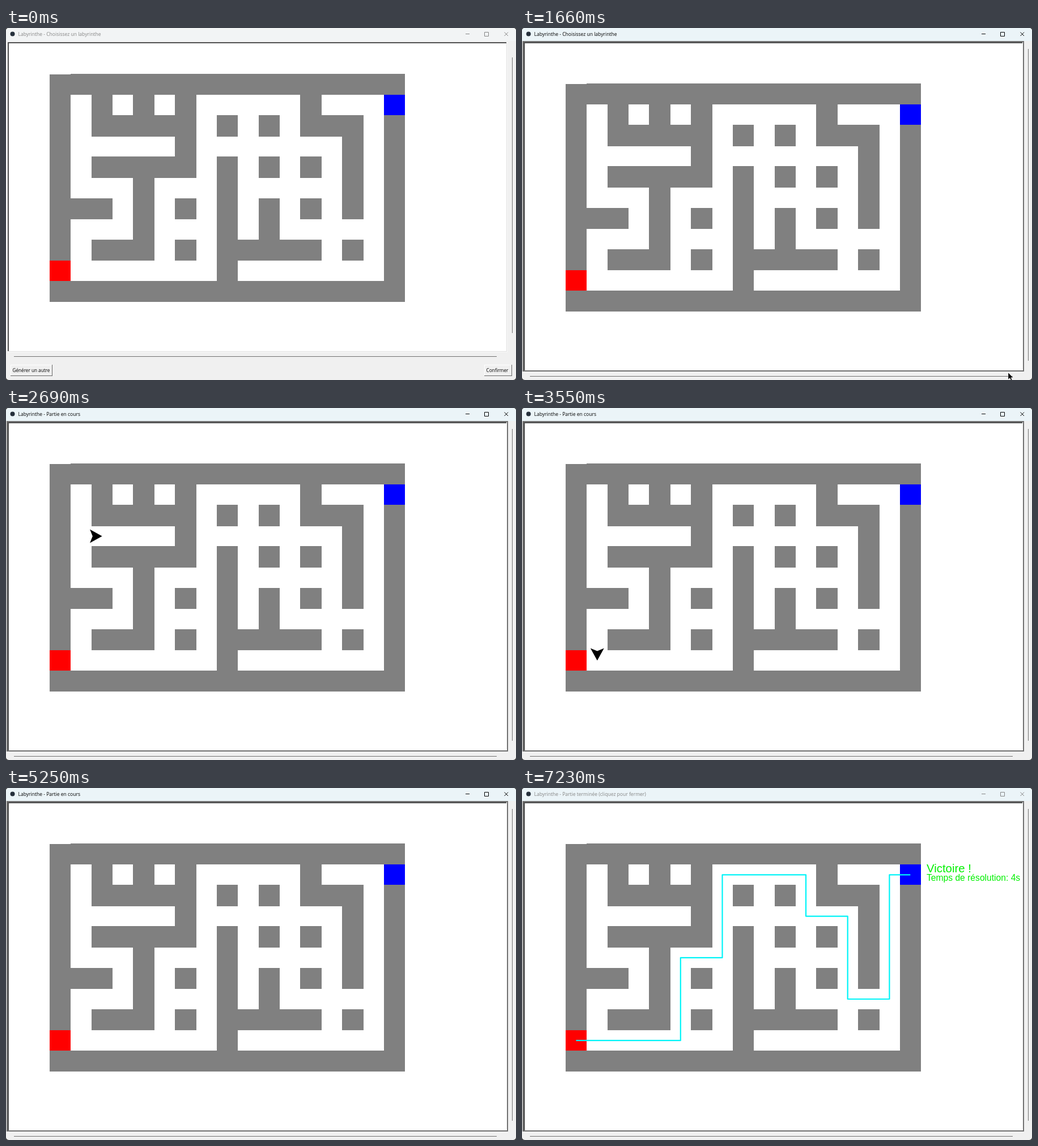
Recreate the animation shown at these times as an HTML page. Size 900 by 622 pixels, loop 7310 ms.

```html
<!DOCTYPE html>
<html lang="fr">
<head>
<meta charset="utf-8">
<title>Labyrinthe</title>
<style>
  html, body { margin: 0; width: 100%; height: 100%; overflow: hidden; background: #3a3a3a; }
  svg { display: block; width: 900px; height: 622px; }
  .ui { font-family: "Open Sans", "Noto Sans", sans-serif; }
  .score { font-family: "Liberation Sans", Arial, sans-serif; fill: #00f000; }
  .crisp { shape-rendering: crispEdges; }
</style>
</head>
<body>
<svg viewBox="0 0 900 622" xmlns="http://www.w3.org/2000/svg">
  <rect width="900" height="622" rx="5" fill="#f0f0f0"/>
  <path id="bar" d="M0 23V5Q0 0 5 0H895Q900 0 900 5V23Z"/>
  <circle cx="11.5" cy="10.5" r="4" fill="#26303c"/>
  <text id="title" class="ui" x="21.5" y="14" font-size="8.55"></text>
  <path id="controls" d="M811 10.5H818M844.5 7.5H851.5V14.5H844.5ZM879.5 7.5L886 14M886 7.5L879.5 14" fill="none" stroke-width="1"/>

  <g id="chooser" class="crisp">
    <rect x="3" y="25" width="882" height="548" fill="#fff"/>
    <path d="M884.5 25V572.5H3" fill="none" stroke="#fafafa"/>
    <path d="M883.5 26V571.5H4" fill="none" stroke="#e0e0e0"/>
    <path d="M4 571V26H883" fill="none" stroke="#505050" stroke-width="2"/>
    <path d="M893.5 52V539M14 580.5H866" stroke="#707070"/>
    <path d="M8.500 614V595.500H81M844.500 614V595.500H892" fill="none" stroke="#fff"/>
    <path d="M8 614.500H81.500V595M844 614.500H892.500V595" fill="none" stroke="#696969"/>
    <g class="ui" font-size="8.2">
      <text x="11.500" y="608">Générer un autre</text>
      <text x="847.500" y="608">Confirmer</text>
    </g>
  </g>

  <g id="board" class="crisp">
    <rect x="2" y="24" width="883" height="582" fill="#fff" stroke="#707070" stroke-width="2"/>
    <path d="M4 605V26H883" fill="none" stroke="#505050" stroke-width="2"/>
    <path d="M893.5 37V588M14 615.5H866" stroke="#707070"/>
  </g>

  <g id="maze" class="crisp"></g>
  <path id="trail" fill="none" stroke="#00f4f8" stroke-width="2.2" stroke-linejoin="round"/>
  <path id="player" d="M0 0L-21.6 -12L-16.8 0L-21.6 12Z"/>
  <g id="score" class="score">
    <text x="714" y="149" font-size="20.4">Victoire !</text>
    <text x="714" y="164" font-size="15.65">Temps de résolution: 4s</text>
  </g>
  <path id="cursor" d="M0 0V12L2.8 9.4L5 13.5L6.8 12.6L4.8 8.7H8.500Z" stroke="#fff" stroke-width=".4"/>
</svg>
<script>
const LOOP = 7310, GAME_START = 1830, STEP = 77.7;
const $ = id => document.getElementById(id);
const show = (id, on) => $(id).setAttribute('display', on ? 'inline' : 'none');

const MAP = [
  '#################',
  '#.#.#.#.....#...B',
  '#.#####.#.#.###.#',
  '#.....#.......#.#',
  '#.#####.#.#.#.#.#',
  '#...#...#.....#.#',
  '###.#.#.#.#.#.#.#',
  '#...#...#.#.....#',
  '#.###.#.#####.#.#',
  'R.......#.......#',
  '#################'
];
const left = col => 77 + 36.87 * col;
const top_ = row => 98 + 36.6 * row;
const centerX = col => left(col) + 18.4;
const centerY = row => top_(row) + 18.8;

function buildMaze() {
  const colors = { R: '#f00', B: '#00f', '#': '#808080' };
  const rect = (x, y, w, h, fill) => `<rect x="${x}" y="${y}" width="${w}" height="${h}" fill="${fill}"/>`;
  let markup = '';
  for (const kind of 'RB#') {
    MAP.forEach((line, row) => [...line].forEach((cell, col) => {
      if (cell !== kind) return;
      const x = Math.round(left(col)), y = Math.round(top_(row));
      markup += rect(x, y, Math.round(left(col) + 37.4) - x, Math.round(top_(row) + 37.4) - y, colors[kind]);
    }));
  }
  $('maze').innerHTML = markup + rect(77, 98, 37, 1, '#fff');
}

const DIRS = { R: [1, 0, 0], D: [0, 1, 90], L: [-1, 0, 180], U: [0, -1, 270] };

// Expands runs such as "U4" into poses; a turn may cost one pose of its own.
function walk(route, turnsCount) {
  const poses = [{ col: 0, row: 9, angle: 0 }];
  for (const run of route.split(' ')) {
    const [dx, dy, angle] = DIRS[run[0]];
    let last = poses[poses.length - 1];
    if (turnsCount && last.angle !== angle) poses.push(last = { ...last, angle });
    for (let i = 0; i < +run[1]; i++) {
      poses.push(last = { col: last.col + dx, row: last.row + dy, angle });
    }
  }
  return poses;
}
const ENDING = 'U4 R2 U4 R4 D2 R2 D4 R2 U6 R1';
const played = walk('R1 U2 R2 U2 L2 U4 D2 R4 L4 D2 R2 D2 L2 D2 R4 ' + ENDING, true);
const solution = walk('R5 ' + ENDING, false);

// Linear interpolation through [input, value] pairs.
function along(keys, x) {
  if (x <= keys[0][0]) return keys[0][1];
  for (let i = 1; i < keys.length; i++) {
    const [x0, v0] = keys[i - 1], [x1, v1] = keys[i];
    if (x <= x1) return v0 + (v1 - v0) * (x - x0) / (x1 - x0);
  }
  return keys[keys.length - 1][1];
}
const PLAY_PACE = [[0, 0], [9, 19], [19, 40], [29, 63], [39, 83], [43, 92]];
const TRAIL_PACE = [[46, 0], [49, 9], [55, 26], [59, 35], [60, 36]];

// Pointer stops: [from ms, x, y]; a stop without a place hides it.
const POINTER = [
  [0], [160, 156, 12], [235, 342, 211], [312, 527, 410], [390, 713, 608], [470],
  [710, 845, 618], [790, 850, 617], [870, 853, 616], [1040, 855, 611],
  [1110, 857, 607], [1270, 856, 606], [1430, 857, 608], [1660, 858, 609], [GAME_START]
];

function titleAt(t, step) {
  if (t < GAME_START) return 'Choisissez un labyrinthe';
  if (step < 45) return 'Partie en cours';
  if (step < 60) return 'Victoire : visualisation du chemin gagnant';
  return 'Partie terminée (cliquez pour fermer)';
}

function render(t) {
  const step = Math.floor((t - GAME_START + 15) / STEP);
  const active = t >= 1040 && t < 7230;
  const choosing = t < 1430;

  $('title').textContent = 'Labyrinthe - ' + titleAt(t, step);
  $('title').setAttribute('fill', active ? '#000' : '#858585');
  $('controls').setAttribute('stroke', active ? '#000' : '#858585');
  $('bar').setAttribute('fill', t < 1040 ? '#f2f4f5' : '#ebf4f8');

  show('chooser', choosing);
  show('board', !choosing);
  $('maze').setAttribute('transform', `translate(0 ${choosing ? -17 : 0})`);

  const playing = t >= GAME_START && step < 44;
  show('player', playing);
  if (playing) {
    const { col, row, angle } = played[Math.floor(along(PLAY_PACE, step) + 1e-6)];
    $('player').setAttribute('transform', `translate(${centerX(col) + .5} ${centerY(row)}) rotate(${angle})`);
  }

  show('score', step >= 45);
  const reached = Math.floor(along(TRAIL_PACE, step) + 1e-6);
  show('trail', reached > 0);
  $('trail').setAttribute('d', 'M' + solution.slice(0, reached + 1)
    .map(p => `${centerX(p.col).toFixed(1)} ${centerY(p.row).toFixed(1)}`).join('L'));

  const [, x, y] = POINTER.filter(stop => stop[0] <= t).pop();
  show('cursor', x !== undefined);
  if (x !== undefined) $('cursor').setAttribute('transform', `translate(${x} ${y})`);
}

buildMaze();
const start = performance.now();
function tick(now) {
  render(Math.max(0, now - start) % LOOP);
  requestAnimationFrame(tick);
}
render(0);
requestAnimationFrame(tick);
</script>
</body>
</html>
```
